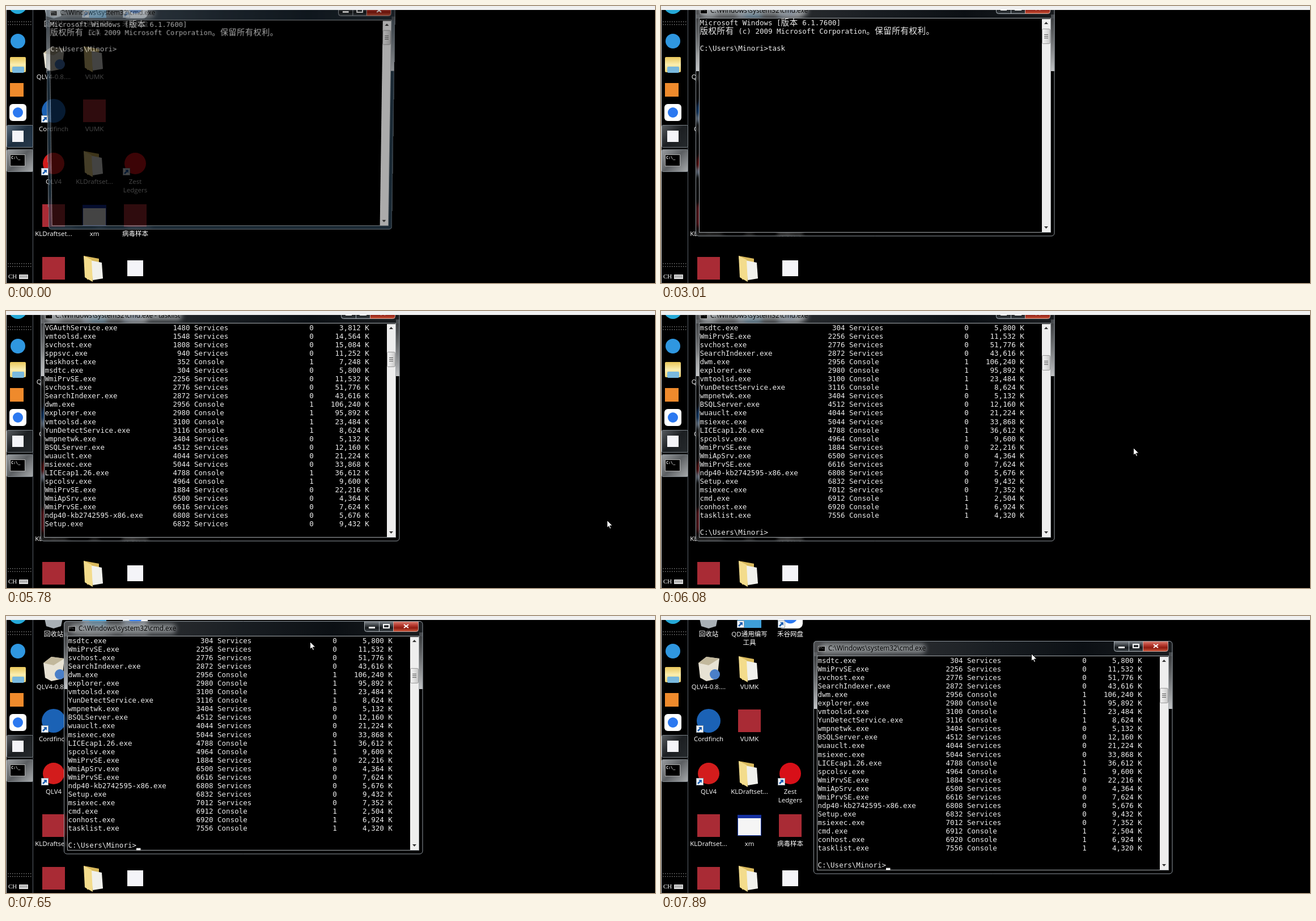
Write an HTML page with a canvas that moves like this. It is 1145x489 px and loops after 8000 ms.

```html
<!DOCTYPE html>
<html lang="zh">
<head>
<meta charset="utf-8">
<title>Console</title>
<style>
html, body { margin: 0; width: 100%; height: 100%; overflow: hidden; background: #000; }
canvas { display: block; }
</style>
</head>
<body>
<canvas id="stage" width="1145" height="489"></canvas>
<script>
const W = 1145, H = 489, LOOP = 8000;
const CELL = 7.53, LINE = 15.07, ROWS = 25;
const WIN = { w: 633.5, h: 411.5 };
const UI = '"Open Sans", "Noto Sans CJK SC", "Noto Sans CJK", sans-serif';
const MONO = '"DejaVu Sans Mono", "Noto Sans CJK SC", "Noto Sans CJK", monospace';
const INK = '#ececec';

const mix = (a, b, k) => a + (b - a) * k;
const clamp = k => Math.min(1, Math.max(0, k));
const steps = (t, from, size) => Math.max(0, Math.floor((t - from) / size));
const within = (t, spans) => spans.some(([a, b]) => t >= a && t < b);

// Console text

const PROMPT = 'C:\\Users\\Minori>';
const COMMAND = 'tasklist';

const processLine = (name, pid, mem, owner) =>
  name.padEnd(25) + String(pid).padStart(9) + ' ' + (owner ? 'Console' : 'Services').padEnd(16) +
  (owner ? '1' : '0').padStart(12) + (mem + ' K').padStart(13);

// These scroll past too fast to read.
const EARLY = ['System Idle Process', 'System', 'smss.exe', 'csrss.exe', 'wininit.exe', 'winlogon.exe',
  'services.exe', 'lsass.exe', 'lsm.exe', ...Array(12).fill('svchost.exe')]
  .map((name, i) => {
    const mem = 4000 + Math.floor(Math.abs(Math.sin(i * 7.3)) * 12000);
    return processLine(name, i * 68, mem.toLocaleString('en-US'));
  });

// A trailing * marks a console session.
const LATE = `VGAuthService.exe 1480 3,812
vmtoolsd.exe 1548 14,564
svchost.exe 1808 15,084
sppsvc.exe 940 11,252
taskhost.exe 352 7,248 *
msdtc.exe 304 5,800
WmiPrvSE.exe 2256 11,532
svchost.exe 2776 51,776
SearchIndexer.exe 2872 43,616
dwm.exe 2956 106,240 *
explorer.exe 2980 95,892 *
vmtoolsd.exe 3100 23,484 *
YunDetectService.exe 3116 8,624 *
wmpnetwk.exe 3404 5,132
BSQLServer.exe 4512 12,160
wuauclt.exe 4044 21,224
msiexec.exe 5044 33,868
LICEcap1.26.exe 4788 36,612 *
spcolsv.exe 4964 9,600 *
WmiPrvSE.exe 1884 22,216
WmiApSrv.exe 6500 4,364
WmiPrvSE.exe 6616 7,624
ndp40-kb2742595-x86.exe 6808 5,676
Setup.exe 6832 9,432
msiexec.exe 7012 7,352
cmd.exe 6912 2,504 *
conhost.exe 6920 6,924 *
tasklist.exe 7556 4,320 *`.split('\n').map(row => processLine(...row.split(' ')));

const LINES = [
  'Microsoft Windows [版本 6.1.7600]',
  '版权所有 (c) 2009 Microsoft Corporation。保留所有权利。',
  '', PROMPT, '',
  '映像名称' + 'PID'.padStart(26) + ' 会话名' + '会话#'.padStart(17) + '内存使用'.padStart(11),
  [25, 8, 16, 11, 12].map(n => '='.repeat(n)).join(' '),
  ...EARLY, ...LATE, '', PROMPT
];

// Motion: every value depends on the time alone

const ENTER = 4840, DONE = 5930, DRAG = 7650;
const CARET = [[850, 1410], [2390, 3010], [4300, 4550], [ENTER, 5090], [6510, 7120], [DRAG, LOOP]];

function opening(t) {
  const left = 1 - clamp(steps(t, -30, 150) / 3);
  return 1 - left * left;
}

function typed(t) {
  const first = Math.min(4, steps(t, 1410, 167));
  const second = Math.min(3, steps(t, 3010, 150));
  return first + second + (t >= 3770);
}

function printed(t) {
  if (t >= DONE) return LINES.length;
  return t < 5400 ? 4 : Math.min(52, 26 + 13 * steps(t, 5400, 190));
}

const drag = t => steps(t, DRAG, 120) / 2;

function mouse(t) {
  if (t < 5400) return null;
  if (t >= DRAG) return [mix(536, 653, drag(t)), mix(45, 66, drag(t))];
  const rise = clamp(steps(t, 5400, 190) / 2);
  const sweep = 1 - (1 - clamp(steps(t, 5780, 150) / 10)) ** 2;
  return [mix(mix(1071, 1060, rise), 429, sweep), mix(mix(436, 369, rise), 14, sweep)];
}

// Drawing helpers

function layer(w, h) {
  const canvas = document.createElement('canvas');
  canvas.width = w;
  canvas.height = h;
  return canvas.getContext('2d');
}

function rect(c, x, y, w, h, fill, stroke) {
  c.fillStyle = fill;
  c.fillRect(x, y, w, h);
  if (stroke) { c.strokeStyle = stroke; c.lineWidth = 1; c.strokeRect(x + .5, y + .5, w - 1, h - 1); }
}

function rounded(c, x, y, w, h, r, fill, stroke) {
  c.beginPath();
  c.roundRect(x, y, w, h, r);
  if (fill) { c.fillStyle = fill; c.fill(); }
  if (stroke) { c.strokeStyle = stroke; c.lineWidth = 1; c.stroke(); }
}

function disc(c, x, y, r, fill) {
  rounded(c, x - r, y - r, 2 * r, 2 * r, r, fill);
}

function shape(c, x, y, path, fill, stroke) {
  c.save();
  c.translate(x, y);
  const p = new Path2D(path);
  c.fillStyle = fill;
  c.fill(p);
  if (stroke) { c.strokeStyle = stroke; c.lineWidth = 1; c.stroke(p); }
  c.restore();
}

function text(c, s, x, y, font, fill, align = 'left') {
  c.font = font;
  c.fillStyle = fill;
  c.textAlign = align;
  c.textBaseline = 'middle';
  c.fillText(s, x, y);
}

function ramp(c, x0, y0, x1, y1, ...colors) {
  const g = c.createLinearGradient(x0, y0, x1, y1);
  colors.forEach((color, i) => g.addColorStop(i / (colors.length - 1), color));
  return g;
}

// Desktop icons, drawn around their centre

const square = (size, fill) => (c, x, y) => rect(c, x - size / 2, y - size / 2, size, size, fill);
const ball = (r, fill) => (c, x, y) => disc(c, x, y, r, fill);
const archive = square(40, '#a92b35'), recorder = square(28, '#f4f4f8');

function tile(c, x, y, size = 44) {
  rounded(c, x - size / 2, y - size / 2, size, size, size / 5, '#fff');
  disc(c, x, y, size * .3, '#2b78f0');
}

function linked(icon) {
  return (c, x, y) => {
    icon(c, x, y);
    rect(c, x - 22, y + 8, 13, 13, '#f4f7fa', '#8a9aa8');
    shape(c, x - 22, y + 8, 'M4 3h6v6l-2-2-4 4-2-2 4-4z', '#1c5fb0');
  };
}

function bin(c, x, y) {
  shape(c, x, y, 'M-17 0h34l-4 18-13 4-13-4z', '#a9b0b5');
}

function setup(c, x, y) {
  shape(c, x, y, 'M-18-10l14-11 23 3-4 36-19 4-11-6z', '#e7e2d4');
  shape(c, x, y, 'M-18-10L0-6l19-12-23-3z', '#c2b89c');
  disc(c, x + 11, y + 10, 9, '#4a7fc8');
}

function folder(c, x, y) {
  shape(c, x, y, 'M-19-22L8-17v34l-21 3z', '#d9b95c');
  shape(c, x, y, 'M-7-14l20 4 2 28-18 3z', '#f1f1ec');
  shape(c, x, y, 'M-19-22l14 7 2 39-14-8z', '#f3dc8c');
}

function appWindow(c, x, y) {
  rect(c, x - 21, y - 19, 42, 37, '#f5f5f5', '#1e3fae');
  rect(c, x - 21, y - 19, 42, 6, '#1430a0');
}

const ICONS = [
  [[bin, '回收站'], [linked(square(42, '#3f9fd8')), 'QD通用编写\n工具'], [linked(tile), '禾谷网盘']],
  [[setup, 'QLV4-0.8....'], [folder, 'VUMK']],
  [[linked(ball(21, '#1b62b5')), 'Cordfinch'], [archive, 'VUMK']],
  [[linked(ball(19, '#d31c1c')), 'QLV4'], [folder, 'KLDraftset...'], [linked(ball(19, '#d80f18')), 'Zest\nLedgers']],
  [[archive, 'KLDraftset...'], [appWindow, 'xm'], [archive, '病毒样本']],
  [[archive, ''], [folder, ''], [recorder, '']]
];

function paintDesktop(c) {
  rect(c, 0, 0, W, H, '#000');
  ICONS.forEach((row, r) => row.forEach(([icon, label], col) => {
    const x = 84 + col * 72, y = Math.round(r * 92.5);
    icon(c, x, y);
    label.split('\n').forEach((s, i) => text(c, s, x, y + 32.5 + i * 15, `11.5px ${UI}`, '#fff', 'center'));
  }));
}

function consoleIcon(c, x, y, w, h) {
  rect(c, x, y, w, h, '#000', '#aaa');
  text(c, 'C:\\_', x + 2, y + h * .3, `bold ${h * .32}px ${MONO}`, '#fff');
}

function paintTaskbar(c, settled) {
  rect(c, 1, 7, 47, H, '#000');
  rect(c, 47, 7, 1, H, '#59616a');
  for (const y of [27, 32, 454, 459])
    for (let x = 3; x < 46; x += 4) rect(c, x, y, 1.5, 1.5, '#777');

  disc(c, 21, -2, 16, '#25a9d8');
  disc(c, 21, 62, 13, '#2f97e0');
  rounded(c, 7, 90, 28, 27, 2, ramp(c, 0, 90, 0, 117, '#e8c65a', '#fbeeb0', '#ecd070'));
  rounded(c, 11, 107, 21, 11, 2, '#79b9de');
  square(24, '#ef8a2c')(c, 19, 148);
  tile(c, 21, 188, 30);

  const item = (y, ...shades) => rounded(c, 1.5, y + .5, 46, 39, 2, ramp(c, 2, y, 44, y + 40, ...shades), '#7d848a');
  if (settled) item(210, '#585c60', '#1c1f22', '#25292c');
  else item(210, '#5a6c7c', '#1e2f40', '#26384a');
  square(20, '#f4f4f8')(c, 21, 230);
  item(253, '#9a9da0', '#5c5f62', '#a3a6a8');
  consoleIcon(c, 7, 262, 27, 21);

  text(c, 'CH', 4, 478, '11px "Liberation Serif", serif', '#fff');
  rect(c, 23, 474, 16, 8, '#d8d8d8');
  for (let i = 0; i < 12; i++) rect(c, 25 + i % 6 * 2.2, 476 + (i / 6 | 0) * 2, 1, 1, '#333');
}

// Console window

// Each character keeps to the console grid; wide characters take two cells.
function gridText(c, s, x, y) {
  let col = 0;
  for (const ch of s) {
    const wide = ch > '\u2fff';
    if (ch !== ' ') text(c, ch, x + col * CELL, y, `${wide ? 14.5 : 12.5}px ${MONO}`, INK);
    col += wide ? 2 : 1;
  }
  return col;
}

function paintButtons(c) {
  const dark = ramp(c, 0, 0, 0, 18, '#8b9095', '#4c5156', '#15181b', '#3d4348');
  const red = ramp(c, 0, 0, 0, 18, '#d99083', '#c0453a', '#8e1a10', '#c8553a');
  rounded(c, 530.5, .5, 26, 18, [0, 0, 0, 4], dark, '#a9b0b6');
  rounded(c, 556.5, .5, 25, 18, 0, dark, '#a9b0b6');
  rounded(c, 581.5, .5, 44, 18, [0, 0, 4, 0], red, '#c0a8a4');
  rect(c, 538, 10, 11, 3, '#fff');
  c.strokeStyle = '#fff';
  c.lineWidth = 2;
  c.strokeRect(564, 6, 10, 6);
  c.stroke(new Path2D('M600 6l8 6m0-6l-8 6'));
}

function paintScrollbar(c, scroll) {
  rect(c, 611, 28, 15, 376, '#eee');
  shape(c, 618.5, 35, 'M-3.5 2L0-2l3.5 4z', '#333');
  shape(c, 618.5, 396, 'M-3.5-2L0 2l3.5-4z', '#333');
  const y = 45 + Math.round(scroll * 1.15);
  rounded(c, 611.5, y + .5, 14, 26, 2, ramp(c, 611, 0, 626, 0, '#f7f7f7', '#c6c6c6'), '#999');
  for (let i = 0; i < 3; i++) rect(c, 615, y + 10 + i * 3, 7, 1, '#555');
}

function paintGlass(c, x, y, open) {
  c.filter = 'blur(4px)';
  c.drawImage(desktop.canvas, -x, -y);
  c.filter = 'none';
  rect(c, 0, 0, WIN.w, WIN.h, open < 1 ? 'rgba(50,76,98,.75)' : 'rgba(0,0,0,.25)');
  rect(c, 0, 0, WIN.w, 27, ramp(c, 0, 0, WIN.w, 18, 'rgba(150,153,157,.5)', 'rgba(80,85,91,.5)',
    'rgba(38,45,52,.65)', 'rgba(16,22,28,.7)', 'rgba(36,40,44,.7)'));
  for (const side of [0, 627])
    rect(c, side, 20, 7, 100, ramp(c, 0, 20, 0, 120, 'rgba(110,114,118,.5)', 'rgba(215,217,219,.9)'));
}

function paintWindow(c, t, x, y, open) {
  const running = t >= ENTER && t < DONE;
  const rows = LINES.slice(0, printed(t));
  rows[3] += COMMAND.slice(0, typed(t));
  if (running) rows.push('');
  const scroll = Math.max(0, rows.length - ROWS);

  c.clearRect(0, 0, 640, 420);
  c.save();
  rounded(c, 0, 0, WIN.w, WIN.h, 5, '#000');
  c.clip();
  paintGlass(c, x, y, open);

  c.filter = 'blur(4px)';
  rounded(c, 12, 5, running ? 238 : 186, 17, 8, 'rgba(165,168,171,.75)');
  c.filter = 'none';
  consoleIcon(c, 8, 9, 13, 10);
  text(c, 'C:\\Windows\\system32\\cmd.exe' + (running ? ' - tasklist' : ''), 26, 13.5, `11.8px ${UI}`, '#000');
  paintButtons(c);

  rect(c, 6, 26, 621, 379, '#000', '#a4a9ad');
  const view = rows.slice(scroll);
  let col = 0;
  view.forEach((row, i) => { col = gridText(c, row, 7.5, 35.5 + i * LINE); });
  if (within(t, CARET)) rect(c, 7.5 + col * CELL, 39 + (view.length - 1) * LINE, 7.5, 4, INK);
  paintScrollbar(c, scroll);
  c.restore();
  rounded(c, .5, .5, WIN.w - 1, WIN.h - 1, 5, null, '#8f979e');
}

// The opening window is see-through and tilted: draw it row by row.
function drawOpening(c, k) {
  const scale = mix(.96, 1, k), shift = mix(4.2, 0, k);
  c.globalAlpha = mix(.72, 1, k);
  for (let y = 7; y < 410; y++) {
    const row = (y - shift) / scale + 5;
    if (row > WIN.h) break;
    const lean = row / WIN.h;
    const left = mix(70 + 5 * lean, 61, k), right = mix(687 - 6 * lean, 694.5, k);
    c.drawImage(pane.canvas, 0, row, WIN.w, 1, left, y, right - left, 1);
  }
  c.globalAlpha = 1;
}

const stage = document.getElementById('stage').getContext('2d');
const desktop = layer(W, H), pane = layer(640, 420);
paintDesktop(desktop);

function frame(now) {
  const t = now % LOOP;
  const open = opening(t);
  const x = t < DRAG ? 61 : Math.round(mix(102, 269, drag(t)));
  const y = t < DRAG ? -5 : Math.round(mix(9, 44, drag(t)));
  stage.drawImage(desktop.canvas, 0, 0);
  paintTaskbar(stage, open === 1);
  paintWindow(pane, t, x, y, open);
  if (open < 1) drawOpening(stage, open);
  else stage.drawImage(pane.canvas, x, y);
  rect(stage, 0, 0, W, 7, '#f0f0f0');
  rect(stage, 0, 7, 1, H, '#d8d8d8');
  const pointer = mouse(t);
  if (pointer) shape(stage, ...pointer.map(v => Math.round(v) + .5), 'M0 0v13l3-2.5 2 4.5 2-1-2-4.5h4.5z', '#fff', '#000');
  requestAnimationFrame(frame);
}
requestAnimationFrame(frame);
</script>
</body>
</html>
```
